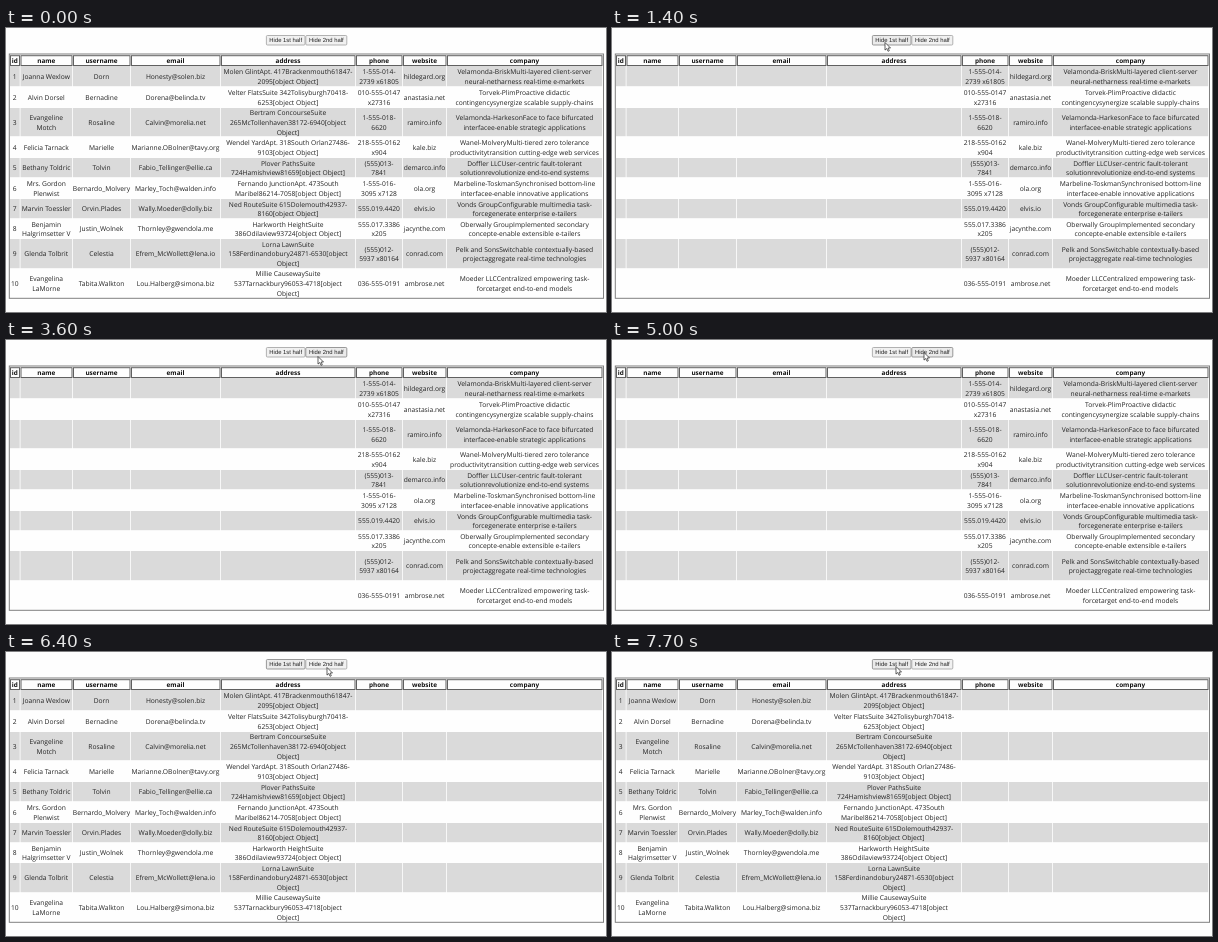
Write an HTML page that moves like this. It is 600 px wide and 284 px high and loops after 8000 ms.

```html
<!DOCTYPE html>
<html lang="en">
<head>
<meta charset="utf-8">
<title>Table halves</title>
<style>
  html, body { margin: 0; width: 100%; height: 100%; overflow: hidden; background: #fefefe; }
  svg { display: block; width: 600px; height: 284px; }
  text { font: 6.7px "Open Sans", "Noto Sans", sans-serif; fill: #222; text-anchor: middle; text-rendering: geometricPrecision; }
  .head { font-weight: 700; font-size: 6.4px; fill: #111; }
  .button text { font: 5.9px "Liberation Sans", Arial, sans-serif; fill: #222; }
  .button rect { fill: #f1f1f1; stroke: #a0a0a0; stroke-width: .8; }
  .button.hover rect { fill: #ebebeb; stroke: #808080; }
  .frame { fill: none; stroke: #808080; stroke-width: 1; }
  .cell { fill: none; stroke: #606060; stroke-width: 1; }
  .stripe { fill: #dadada; }
</style>
</head>
<body>
<svg id="stage" viewBox="0 0 600 284"></svg>
<script>
const LOOP = 8000;
const heads = ["id", "name", "username", "email", "address", "phone", "website", "company"];
const edges = [4, 14.5, 67, 125, 215, 350, 397, 441, 597];
const tops = [38, 59, 80, 109, 130, 150, 171, 191, 211, 241, 270];

// One row per line, cells split by ";", text lines split by "/". "{}" is a stringified object.
const rows = `
Joanna Wexlow;Dorn;Honesty@solen.biz;Molen GlintApt. 417Brackenmouth61847-/2095{};1-555-014-/2739 x61805;hildegard.org;Velamonda-BriskMulti-layered client-server/neural-netharness real-time e-markets
Alvin Dorsel;Bernadine;Dorena@belinda.tv;Velter FlatsSuite 342Tolisyburgh70418-/6253{};010-555-0147/x27316;anastasia.net;Torvek-PlimProactive didactic/contingencysynergize scalable supply-chains
Evangeline/Motch;Rosaline;Calvin@morelia.net;Bertram ConcourseSuite/265McTollenhaven38172-6940[object/Object];1-555-018-/6620;ramiro.info;Velamonda-HarkesonFace to face bifurcated/interfacee-enable strategic applications
Felicia Tarnack;Marielle;Marianne.OBolner@tavy.org;Wendel YardApt. 318South Orlan27486-/9103{};218-555-0162/x904;kale.biz;Wanel-MolveryMulti-tiered zero tolerance/productivitytransition cutting-edge web services
Bethany Toldric;Tolvin;Fabio_Tellinger@ellie.ca;Plover PathsSuite/724Hamishview81659{};(555)013-/7841;demarco.info;Doffler LLCUser-centric fault-tolerant/solutionrevolutionize end-to-end systems
Mrs. Gordon/Plenwist;Bernardo_Molvery;Marley_Toch@walden.info;Fernando JunctionApt. 473South/Maribel86214-7058{};1-555-016-/3095 x7128;ola.org;Marbeline-ToskmanSynchronised bottom-line/interfacee-enable innovative applications
Marvin Toessler;Orvin.Plades;Wally.Moeder@dolly.biz;Ned RouteSuite 615Dolemouth42937-/8160{};555.019.4420;elvis.io;Vonds GroupConfigurable multimedia task-/forcegenerate enterprise e-tailers
Benjamin/Halgrimsetter V;Justin_Wolnek;Thornley@gwendola.me;Harkworth HeightSuite/386Odilaview93724{};555.017.3386/x205;jacynthe.com;Oberwally GroupImplemented secondary/concepte-enable extensible e-tailers
Glenda Tolbrit;Celestia;Efrem_McWollett@lena.io;Lorna LawnSuite/158Ferdinandobury24871-6530[object/Object];(555)012-/5937 x80164;conrad.com;Pelk and SonsSwitchable contextually-based/projectaggregate real-time technologies
Evangelina/LaMorne;Tabita.Walkton;Lou.Halberg@simona.biz;Millie CausewaySuite/537Tarnackbury96053-4718[object/Object];036-555-0191;ambrose.net;Moeder LLCCentralized empowering task-/forcetarget end-to-end models`
  .trim().split("\n").map((line, i) => [String(i + 1), ...line.replace("{}", "[object Object]").split(";")]);

// Time and the half that is shown from then on.
const views = [[0, "both"], [1400, "second"], [5100, "first"], [6500, "second"], [7400, "first"]];
// Time and the hovered button.
const hovers = [[0, 0], [500, 1], [3200, 2], [5800, 1], [6700, 2], [7700, 1]];
// Time and the pointer's tip.
const path = [
  [500, 276, 18], [600, 273, 14.5], [2200, 273, 14.5], [2800, 288, 15.5], [2900, 288, 15.5],
  [3200, 308, 16.5], [3400, 308, 16.5], [3600, 312, 16.5], [3900, 312, 16.5], [4200, 312, 12.5],
  [5200, 312, 12.5], [5500, 284, 14.5], [6100, 284, 14.5], [6400, 321, 15.5], [6900, 321, 15.5],
  [7000, 319, 15.5], [7100, 319, 15.5], [7200, 301, 15.5], [7500, 284, 14.5]
];

const stage = document.getElementById("stage");

function add(parent, tag, attrs, text) {
  const el = document.createElementNS("http://www.w3.org/2000/svg", tag);
  for (const key in attrs) el.setAttribute(key, attrs[key]);
  if (text) el.textContent = text;
  parent.append(el);
  return el;
}

function box(parent, x, y, width, height, cls = "") {
  return add(parent, "rect", { x, y, width, height, class: cls });
}

function button(x, width, label) {
  const g = add(stage, "g", { class: "button" });
  box(g, x, 7.5, width, 9.5).setAttribute("rx", 1);
  add(g, "text", { x: x + width / 2, y: 14.4 }, label);
  return g;
}

const buttons = [button(260.4, 38.6, "Hide 1st half"), button(299.8, 41, "Hide 2nd half")];
box(stage, 3.3, 26, 594.2, 244.3, "frame");

const mid = c => (edges[c] + edges[c + 1] - 1) / 2;
heads.forEach((label, c) => {
  box(stage, edges[c] + .5, 27.7, edges[c + 1] - edges[c] - 1.5, 9.8, "cell");
  add(stage, "text", { x: mid(c), y: 35.2, class: "head" }, label);
});

for (let r = 0; r < rows.length; r += 2)
  for (let c = 0; c < heads.length; c++)
    box(stage, edges[c], tops[r], edges[c + 1] - edges[c] - .8, tops[r + 1] - tops[r] - .8, "stripe");

const first = add(stage, "g");
const second = add(stage, "g");
rows.forEach((cells, r) => cells.forEach((cell, c) => {
  const lines = cell.split("/");
  const y = (tops[r] + tops[r + 1] - 1) / 2 + 2.9;
  lines.forEach((line, i) => add(c < 5 ? first : second, "text",
    { x: mid(c), y: y + (i - (lines.length - 1) / 2) * 9.7 }, line));
}));

const pointer = add(stage, "path", {
  d: "M0 0V7.6L1.8 6L3 8.8L4.3 8.2L3.1 5.5H5.5Z",
  fill: "#fff", stroke: "#222", "stroke-width": .7, "stroke-linejoin": "round"
});

const latest = (steps, t) => steps.filter(s => s[0] <= t).pop();

function tip(t) {
  const i = path.findIndex(p => p[0] > t);
  if (i < 0) return path[path.length - 1].slice(1);
  if (i === 0) return path[0].slice(1);
  const a = path[i - 1], b = path[i], k = (t - a[0]) / (b[0] - a[0]);
  return [a[1] + (b[1] - a[1]) * k, a[2] + (b[2] - a[2]) * k];
}

const show = (el, on) => el.setAttribute("visibility", on ? "visible" : "hidden");

function draw(now) {
  const t = Math.floor(now % LOOP / 100) * 100; // ten pictures a second
  const view = latest(views, t)[1];
  show(first, view !== "second");
  show(second, view !== "first");
  const hover = latest(hovers, t)[1];
  buttons.forEach((b, i) => b.classList.toggle("hover", hover === i + 1));
  show(pointer, t >= 500);
  pointer.setAttribute("transform", `translate(${tip(t)})`);
}

const start = performance.now();
function tick() {
  draw(performance.now() - start);
  requestAnimationFrame(tick);
}
tick();
</script>
</body>
</html>
```
